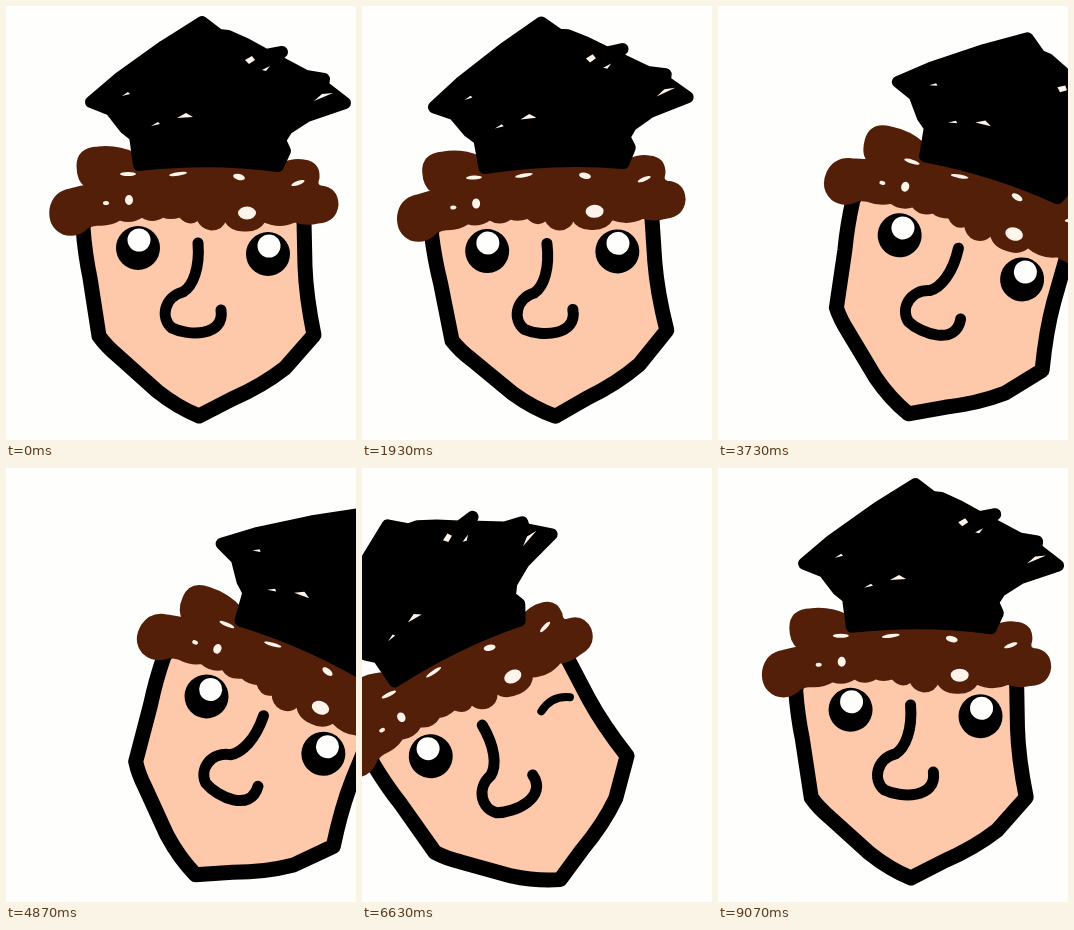
These frames come from a looping animation (350x434 px, 9.11 s). An HTML page:

```html
<!DOCTYPE html>
<html lang="en">
<head>
<meta charset="utf-8">
<title>Swaying graduate</title>
<style>
  html, body { margin: 0; width: 100%; height: 100%; overflow: hidden; background: #fefefc; }
  svg { display: block; width: 100%; height: 100%; }
  .ink { fill: none; stroke: #000; stroke-linecap: round; stroke-linejoin: round; }
  .hair { fill: #531f09; stroke: #531f09; stroke-width: 3; stroke-linejoin: round; }
  .gap { fill: #fff4ea; }
  .shine { fill: #fefefc; }
</style>
</head>
<body>
<svg viewBox="0 0 350 434">
  <g id="head">
    <path class="ink" stroke-width="15" style="fill:#fec8ab"
      d="M85 190L77 222Q79 248 84 272L93 330Q100 340 112 350L151 385Q171 401 193 410L226 393Q256 380 279 362L308 329Q300 290 299 260L298 215L285 190Z"/>

    <path class="hair"
      d="M72 160Q72 143 92 142Q112 140 128 148L276 158Q288 153 298 155Q313 157 312 172Q309 180 315 181Q331 183 331 199Q329 215 312 216Q300 219 289 215Q274 222 258 215Q252 225 238 224Q224 224 219 213Q216 223 205 223Q196 222 192 213Q183 220 174 210Q164 213 157 210Q146 217 136 210Q126 217 114 213Q104 219 92 218Q82 219 79 223Q69 231 57 227Q43 220 45 203Q48 187 64 184L80 180Q72 174 72 160Z"/>
    <g class="gap">
      <ellipse cx="241" cy="207" rx="9" ry="6.5"/>
      <ellipse cx="233" cy="171" rx="6" ry="3" transform="rotate(14 233 171)"/>
      <ellipse cx="292" cy="177" rx="7" ry="2" transform="rotate(-20 292 177)"/>
      <ellipse cx="123" cy="194" rx="4" ry="5"/>
      <ellipse cx="100" cy="197" rx="3" ry="2"/>
      <ellipse cx="122" cy="168" rx="8" ry="2"/>
      <ellipse cx="172" cy="168" rx="9" ry="1.8" transform="rotate(-8 172 168)"/>
    </g>

    <path class="ink" stroke-width="12" style="fill:#000"
      d="M196 16L158 40L112 73L85 96L105 104L119 122L129 130L133 159Q205 151 272 160L279 145L274 134L281 123L301 110L339 97L317 80L318 73L300 70L268 53L276 46L260 49L240 38L222 30L213 29Z"/>
    <g class="gap">
      <path d="M171 112L180 107L187 111ZM308 95L316 88L327 87ZM145 120L152 116L154 118ZM116 90L122 86L124 88Z"/>
      <path d="M239 54L246 50L249 54L243 58ZM256 64L264 60L260 65Z"/>
    </g>

    <path class="ink" stroke-width="11"
      d="M192 237C194 262 187 280 177 286C158 291 154 312 166 322C182 330 219 331 215 304"/>

    <g id="leftOpen">
      <circle cx="132" cy="242" r="22"/><circle class="shine" cx="133" cy="234" r="11.5"/>
    </g>
    <g id="rightOpen">
      <circle cx="262" cy="248" r="22"/><circle class="shine" cx="263" cy="240" r="11.5"/>
    </g>
    <path id="leftShut" class="ink" stroke-width="8" d="M120 243Q136 236 152 245"/>
    <path id="rightShut" class="ink" stroke-width="8" d="M251 251Q267 241 283 251"/>
  </g>
</svg>
<script>
  const LOOP = 9110;
  // Head tilt: [time in ms, degrees]
  const tilt = [
    [0, 0], [450, -7.6], [1130, -3.3], [1550, 0.4], [1980, -2.6], [2770, 2.1],
    [3000, 2.4], [3780, 18], [4350, 25], [4870, 23.5], [5630, -13], [6250, -25],
    [6630, -26.4], [7000, -27], [7500, -23], [8230, -8.8], [8450, -7.8], [9070, 0.2], [LOOP, 0]
  ];
  const BLINK = [1040, 1240];
  const WINK = [6400, 6900];

  const slope = i => (tilt[i + 1][1] - tilt[i][1]) / (tilt[i + 1][0] - tilt[i][0]);

  // Flat at turning points, harmonic mean of the neighbouring slopes elsewhere
  function tangent(i) {
    if (i === 0 || i === tilt.length - 1) return 0;
    const a = slope(i - 1), b = slope(i);
    return a * b > 0 ? 2 * a * b / (a + b) : 0;
  }

  function angleAt(t) {
    let i = 0;
    while (i < tilt.length - 2 && t >= tilt[i + 1][0]) i++;
    const [t0, a0] = tilt[i], [t1, a1] = tilt[i + 1];
    const d = t1 - t0, u = (t - t0) / d, v = 1 - u;
    return a0 * v * v * (1 + 2 * u) + a1 * u * u * (3 - 2 * u)
      + d * u * v * (tangent(i) * v - tangent(i + 1) * u);
  }

  const el = id => document.getElementById(id);
  const within = (t, [from, to]) => t >= from && t < to;

  function setEye(side, shut) {
    el(side + 'Open').style.display = shut ? 'none' : '';
    el(side + 'Shut').style.display = shut ? '' : 'none';
  }

  function draw() {
    const t = performance.now() % LOOP;
    const blink = within(t, BLINK);
    el('head').setAttribute('transform', `rotate(${angleAt(t)} 199 400)`);
    setEye('left', blink);
    setEye('right', blink || within(t, WINK));
    requestAnimationFrame(draw);
  }
  draw();
</script>
</body>
</html>
```
